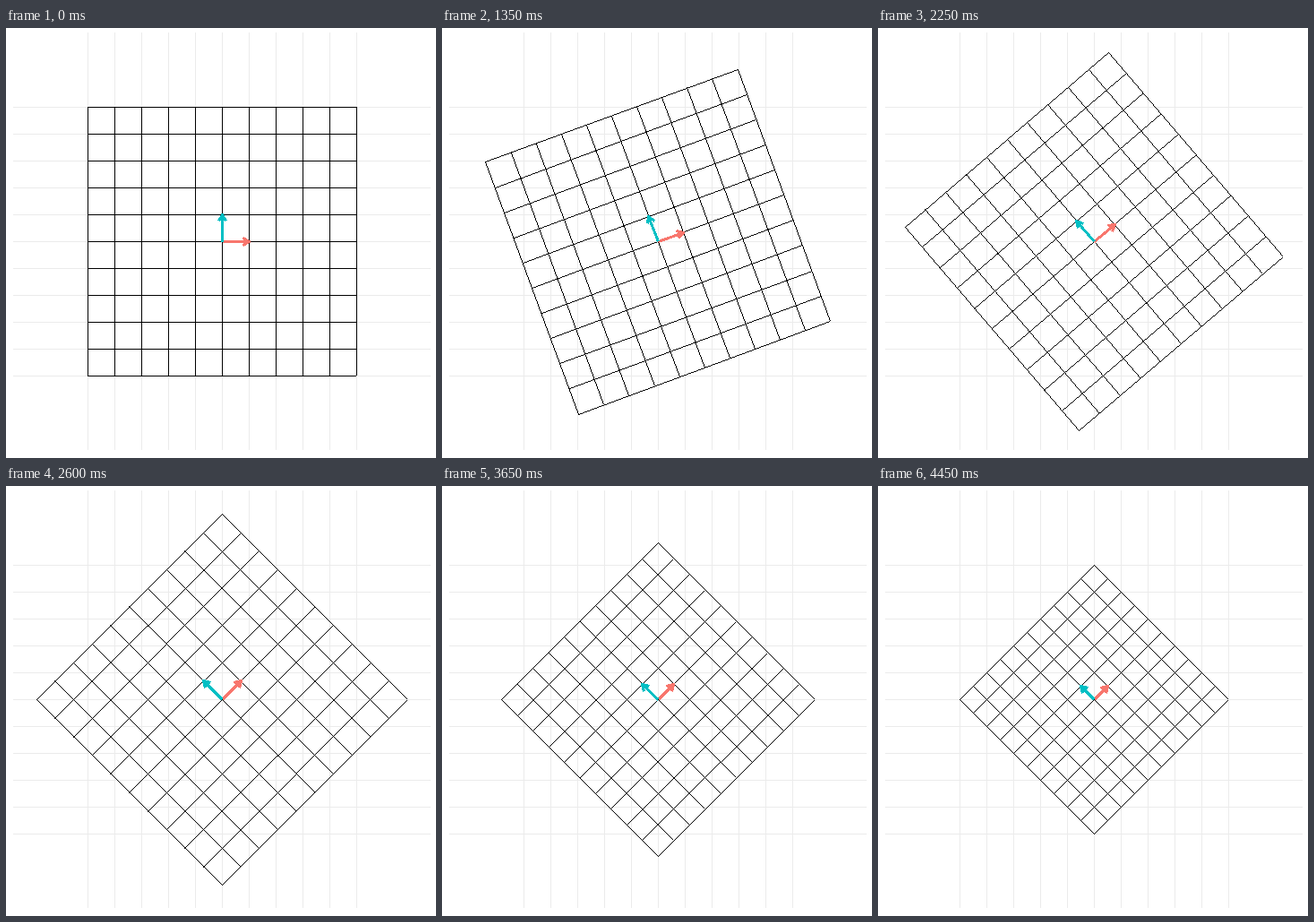
Animation of 480 by 480 pixels, one loop 5000 ms. Source, as an HTML page with a canvas:

```html
<!DOCTYPE html>
<html lang="en">
<head>
<meta charset="utf-8">
<title>Rotating and scaling a grid</title>
<style>
  html, body { margin: 0; width: 100%; height: 100%; overflow: hidden; background: #fff; }
  canvas, svg { position: absolute; left: 0; top: 0; width: 480px; height: 480px; }
  path { fill: none; stroke-width: 3; stroke-linejoin: round; shape-rendering: crispEdges; }
</style>
</head>
<body>
<canvas id="grid" width="480" height="480"></canvas>
<svg viewBox="0 0 480 480">
  <path id="axisX" stroke="#f8766d"/>
  <path id="axisY" stroke="#00bfc4"/>
</svg>
<script>
const LOOP = 5000, STEP = 50, HOLD = 500, LAST = 79;
const CX = 241.37, CY = 238.63, UNIT = 29.973, HALF = 5;
const HEAD = 8.504, SPREAD = Math.PI / 6;

const ctx = document.getElementById('grid').getContext('2d');
const axisX = document.getElementById('axisX');
const axisY = document.getElementById('axisY');

// Hard-edged one pixel line; the end pixel is left out.
function line([x0, y0], [x1, y1]) {
  const dx = x1 - x0, dy = y1 - y0;
  const n = Math.max(Math.abs(dx), Math.abs(dy));
  for (let i = 0; i < n; i++) {
    ctx.fillRect(Math.round(x0 + dx * i / n), Math.round(y0 + dy * i / n), 1, 1);
  }
}

// Rotate by 45 degrees first, then shrink by the square root of two.
function pose(k) {
  const turn = k === 0 ? 0 : Math.min((k + 1) / 40, 1);
  const shrink = Math.max(k - 39, 0) / 40;
  const angle = turn * Math.PI / 4;
  const size = UNIT * (1 + (Math.SQRT1_2 - 1) * shrink);
  const c = size * Math.cos(angle), s = size * Math.sin(angle);
  return (x, y) => [
    Math.floor(CX + x * c - y * s),
    Math.floor(CY - x * s - y * c)
  ];
}

function arrow([x0, y0], [x1, y1]) {
  const back = Math.atan2(y0 - y1, x0 - x1);
  const barb = a => [
    Math.floor(x1 + 0.5 + HEAD * Math.cos(back + a)) + 0.5,
    Math.floor(y1 + 0.5 + HEAD * Math.sin(back + a)) + 0.5
  ];
  const tip = [x1 + 0.5, y1 + 0.5];
  return `M${x0 + 0.5},${y0 + 0.5}L${tip}M${barb(SPREAD)}L${tip}L${barb(-SPREAD)}`;
}

function draw(k) {
  ctx.fillStyle = '#fff';
  ctx.fillRect(0, 0, 480, 480);

  const still = pose(0), at = pose(k);
  ctx.fillStyle = '#ebebeb';
  for (let i = -HALF; i <= HALF; i++) {
    const [x, y] = still(i, i);
    ctx.fillRect(x, 5, 1, 466);
    ctx.fillRect(8, y, 466, 1);
  }

  ctx.fillStyle = '#000';
  for (let i = -HALF; i <= HALF; i++) {
    line(at(-HALF, i), at(HALF, i));
    line(at(i, HALF), at(i, -HALF));
  }

  axisX.setAttribute('d', arrow(at(0, 0), at(1, 0)));
  axisY.setAttribute('d', arrow(at(0, 0), at(0, 1)));
}

let shown = -1;
function tick() {
  const t = performance.now() % LOOP;
  const k = Math.min(Math.max(Math.floor((t - HOLD) / STEP), 0), LAST);
  if (k !== shown) draw(shown = k);
  requestAnimationFrame(tick);
}
tick();
</script>
</body>
</html>
```
